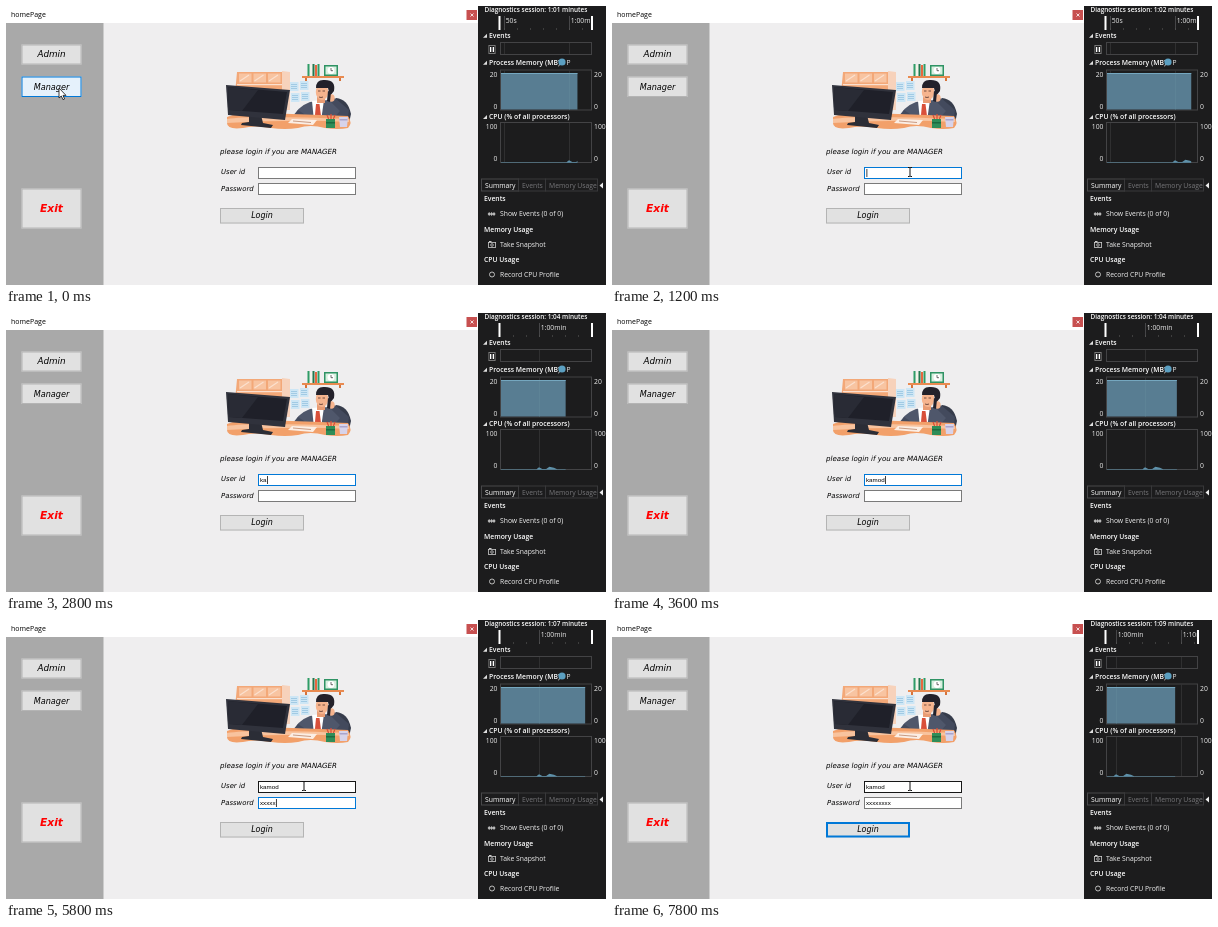
Recreate the animation shown at these times as an HTML page with a canvas. Size 600 by 279 pixels, loop 8000 ms.

```html
<!DOCTYPE html>
<html lang="en">
<head>
<meta charset="utf-8">
<title>Login form</title>
<style>
html, body { margin: 0; width: 100%; height: 100%; overflow: hidden; background: #efeeef; }
canvas { display: block; width: 100%; height: 100%; }
</style>
</head>
<body>
<canvas id="stage"></canvas>
<script>
const W = 600, H = 279, LOOP = 8000, STEP = 200;
const canvas = document.getElementById('stage');
const c = canvas.getContext('2d');
const SCRIPT = '"DejaVu Sans", sans-serif', UI = '"Open Sans", sans-serif', FIELD = '"Liberation Sans", Arial, sans-serif';
const BLUE = '#0078d7', USER = 'kamod';

function fit() {
  const r = window.devicePixelRatio || 1;
  canvas.width = Math.round(innerWidth * r);
  canvas.height = Math.round(innerHeight * r);
}

function rect(x, y, w, h, fill) {
  c.fillStyle = fill;
  c.fillRect(x, y, w, h);
}

function frame(x, y, w, h, color, lw = 1) {
  c.strokeStyle = color;
  c.lineWidth = lw;
  c.strokeRect(x + lw / 2, y + lw / 2, w - lw, h - lw);
}

function text(s, x, y, font, fill, align = 'left') {
  c.font = font;
  c.fillStyle = fill;
  c.textAlign = align;
  c.textBaseline = 'alphabetic';
  c.fillText(s, x, y);
}

const script = (s, x, y, size, { fill = '#000', align, weight = 400 } = {}) =>
  text(s, x, y, `italic ${weight} ${size}px ${SCRIPT}`, fill, align);

function shape(d, fill, stroke, lw = 1) {
  const p = new Path2D(d);
  if (fill) { c.fillStyle = fill; c.fill(p); }
  if (stroke) { c.strokeStyle = stroke; c.lineWidth = lw; c.stroke(p); }
}

function ellipse(x, y, rx, ry, fill) {
  c.beginPath();
  c.ellipse(x, y, rx, ry, 0, 0, Math.PI * 2);
  c.fillStyle = fill;
  c.fill();
}

function clipTo(x, y, w, h, draw) {
  c.save();
  c.beginPath();
  c.rect(x, y, w, h);
  c.clip();
  draw();
  c.restore();
}

// Form

function button(label, x, y, w, h, size, { hot = false, focus = false, fill, weight } = {}) {
  rect(x, y, w, h, hot ? '#e5f1fb' : '#e1e1e1');
  frame(x, y, w, h, hot || focus ? BLUE : '#b4b4b4', focus ? 2 : 1);
  script(label, x + w / 2, y + h / 2 + size * 0.34, size, { fill, weight, align: 'center' });
}

function field(y, value, border, caret) {
  rect(252, y, 98, 12, '#fff');
  frame(252, y, 98, 12, border);
  text(value, 254, y + 8.4, `6.2px ${FIELD}`, '#000');
  if (caret) rect(254.5 + c.measureText(value).width, y + 2, 0.8, 8, '#111');
}

function office() {
  // wall cabinet, notes and shelf
  shape('M231 66H276V98H228Z', '#f3a878');
  for (let i = 0; i < 3; i++) {
    rect(233 + i * 14.5, 67.5, 12.5, 9, '#f8c4a1');
    shape(`M${234 + i * 14.5} 75L${243 + i * 14.5} 69`, null, '#fbe0cf', 1.2);
  }
  rect(231, 78, 45, 1.2, '#fbe0cf');
  shape('M276 65L284 66V104H276Z', '#f7d2bb');
  [[284, 76], [294, 75], [285, 87], [295, 86]].forEach(([x, y]) => {
    rect(x, y, 8.5, 9, '#cde6f5');
    for (let i = 0; i < 3; i++) rect(x + 1, y + 2 + i * 2, 6, 0.7, '#8fbfdd');
  });
  rect(296, 70, 42, 2, '#e98a50');
  rect(299, 72, 2, 3, '#d6733b');
  rect(333, 72, 2, 3, '#d6733b');
  ['#2f9c66', '#f4f4e8', '#23794e', '#e8673f', '#2f9c66'].forEach((f, i) => rect(301.5 + i * 2.5, 58 + i % 2, 2, 12 - i % 2, f));
  rect(318, 59, 14, 11, '#2f9364');
  rect(319.5, 60.5, 11, 8, '#d8efdf');
  ellipse(325, 64.5, 3.4, 3.4, '#fff');
  shape('M325 62V64.7H327', null, '#333', 0.7);

  // chair and worker
  shape('M330 92Q342 93 345 108L343 117H329Z', '#363c4b');
  shape('M285 115Q290 101 304 96L322 94Q337 96 341 116Z', '#4f576b');
  shape('M306 95L318 94L315 115L308 115Z', '#fff');
  shape('M310 98L313.5 98L315 110L312 114L309 109Z', '#d9503a');
  rect(311, 91, 8, 6, '#e99c74');
  ellipse(316, 86, 6.2, 8, '#f6b48e');
  shape('M310 82Q310 73 319 74Q330 74 328 85L324 90L322 82Q315 82 310 82Z', '#23212a');
  shape('M312 85H314.5M316.5 85H319M313 91Q315 92 317 91', null, '#55332c', 0.8);
  shape('M325 115L334 105L325 96L329 92L343 104L342 112L333 117Z', '#434a5d');
  ellipse(325.5, 92, 3.2, 3.8, '#f6b48e');
  shape('M322 85L325 86L324 96L321 95Z', '#23232d');
  shape('M284 116L292 104L298 108L300 115Z', '#434a5d');
  ellipse(300, 114, 4, 2, '#f6b48e');

  // desk
  shape('M221 111Q236 105 258 107L342 110Q347 117 342 122Q332 124 319 122Q304 118 292 122Q279 124 265 122Q248 119 237 122Q221 124 221 117Z', '#f2a06a');
  shape('M221 113Q244 109 343 113V116Q290 113 221 117Z', '#f8c39e');
  shape('M286 113L311 114L307 119L282 117Z', '#fbeee5');
  shape('M287 115L305 116.5', null, '#c99a82', 1);

  // monitor
  shape('M243 108L255 109L257 117L267 119L265 122L235 119L236 117L243 116Z', '#2b2d36');
  shape('M220 79L284 84L279 114L222 109Z', '#30323c');
  shape('M222 81L281 86L277 108L223 104Z', '#1f2029');
  shape('M222 81L252 84L236 105L223 104Z', '#292b35');

  // desk items
  shape('M321 109L323 114M325 108V114M329 109L327 114', null, '#d9503a', 1.3);
  rect(320, 113, 9, 9, '#2f8d58');
  rect(320, 116, 9, 1.5, '#1d6a40');
  shape('M333 111H342L341 121H334Z', '#d7d3ea');
  rect(333.5, 113, 8, 1.5, '#aaa4cc');
}

function form(s) {
  rect(0, 0, 472, H, '#efeeef');
  rect(0, 17, 97.5, H - 17, '#a9a9a9');
  rect(0, 0, 472, 17, '#fff');
  text('homePage', 5, 11, `7px ${UI}`, '#000');
  rect(460.5, 4, 10.5, 10, '#c75050');
  shape('M464.5 7.5L467.5 10.5M467.5 7.5L464.5 10.5', null, '#fff', 0.8);

  button('Admin', 15.5, 38.5, 60, 20, 8.8);
  button('Manager', 15.5, 70.5, 60, 20.5, 8.1, { hot: s.hover, focus: s.focus === 'manager' && !s.hover });
  button('Exit', 15.5, 182.5, 60, 40, 10.7, { fill: '#f00', weight: 700 });

  office();
  script('please login if you are MANAGER', 214, 147.7, 7.1);
  script('User id', 215, 168.3, 6.9);
  script('Password', 215, 185, 6.9);
  field(161, s.user, s.focus === 'user' ? BLUE : s.ibeam ? '#171717' : '#7a7a7a', s.focus === 'user' && s.caret);
  field(177, s.pass, s.focus === 'pass' ? BLUE : '#7a7a7a', s.focus === 'pass' && s.caret);
  button('Login', 214, 202, 84, 15.5, 8, { focus: s.focus === 'login' });
}

// Diagnostics panel

const LEFT = 495, RIGHT = 585, PX = 6.5;
const CPU = [[59.6, 0], [60, 2], [60.5, 0.3], [61.1, 0.3], [61.6, 2.6], [62.3, 1.6], [62.8, 0], [70, 0]];
const bold = (s, x, y, size = 6.8) => text(s, x, y, `600 ${size}px ${UI}`, '#fff');
const plain = (s, x, y, fill = '#f1f1f1') => text(s, x, y, `6.8px ${UI}`, fill);

function chart(y, h, top, xAt) {
  frame(494, y, 92, h, '#434345');
  if (top) {
    [[top, y + 7.3], ['0', y + h - 2]].forEach(([s, ty]) => {
      text(s, 491.5, ty, `6.8px ${UI}`, '#eee', 'right');
      text(s, 588, ty, `6.8px ${UI}`, '#eee');
    });
  }
  for (let k = 50; k <= 70; k += 10) {
    const x = xAt(k);
    if (x > LEFT && x < RIGHT) rect(x, y + 1, 0.7, h - 2, '#38383a');
  }
}

function heading(s, y) {
  shape(`M481 ${y - 4.5}V${y - 0.5}H477Z`, '#e0e0e0');
  bold(s, 483, y);
}

function panel(t) {
  const now = 61.3 + t / 1000;
  const minute = t < 1600 ? 563 : t < 6400 ? 533 : 504;
  const xAt = sec => minute + (sec - 60) * PX;
  const edge = xAt(now);

  rect(472, 0, 128, H, '#1c1c1d');
  bold(`Diagnostics session: 1:0${Math.floor(now) - 60} minutes`, 478.5, 6.4, 6.4);
  clipTo(LEFT, 9, RIGHT - LEFT, 16, () => {
    [[50, '50s'], [60, '1:00min'], [70, '1:10min']].forEach(([sec, label]) => {
      rect(xAt(sec), 10, 0.7, 14, '#5a5a5c');
      text(label, xAt(sec) + 1.7, 17.2, `6.8px ${UI}`, '#eee');
    });
    for (let sec = 48; sec < 76; sec += 2) rect(xAt(sec), 22, 0.6, 2, '#555');
  });
  rect(492.5, 10, 2, 14, '#fff');
  rect(585, 10, 2, 14, '#fff');

  heading('Events', 32.3);
  chart(36, 13, '', xAt);
  frame(482.5, 39, 7, 9, '#8a8a8a', 0.8);
  rect(484, 41, 1.3, 5, '#fff');
  rect(486.7, 41, 1.3, 5, '#fff');

  heading('Process Memory (MB)', 59.2);
  ellipse(556, 56, 3.6, 3.6, '#5b9fc1');
  clipTo(560, 50, 4.5, 11, () => plain('P', 560.5, 59.2));
  chart(63.5, 41, '20', xAt);
  rect(LEFT, 67, edge - LEFT, 36.5, '#587d92');
  rect(LEFT, 67, edge - LEFT, 1, '#75a7bf');
  const grid = xAt(60);
  if (grid < edge) rect(grid, 68, 0.6, 35.5, '#62879a');

  heading('CPU (% of all processors)', 113.4);
  chart(116, 41, '100', xAt);
  clipTo(LEFT, 117, Math.max(0, edge - LEFT), 40, () => {
    const line = CPU.map(([sec, v]) => `L${xAt(sec)} ${156.3 - v}`).join('');
    shape(`M${LEFT} 156.8L${LEFT} 156.3${line}L${xAt(70)} 156.8Z`, '#5e91aa');
  });

  frame(475, 172.5, 38, 13, '#48484a');
  frame(512, 172.5, 28, 13, '#38383a');
  frame(539, 172.5, 53, 13, '#38383a');
  plain('Summary', 479, 181.8, '#fff');
  plain('Events', 516, 181.8, '#77777a');
  clipTo(541, 173, 50, 12, () => plain('Memory Usage', 543, 181.8, '#77777a'));
  shape('M597 176.5V182.5L593.5 179.5Z', '#eee');

  [['Events', 'Show Events (0 of 0)', 195], ['Memory Usage', 'Take Snapshot', 225.5], ['CPU Usage', 'Record CPU Profile', 256]].forEach(([head, row, y]) => {
    bold(head, 478, y);
    plain(row, 494, y + 15.2);
  });
  for (let i = 0; i < 3; i++) shape(`M${481.6 + i * 2.4} 208L${483.2 + i * 2.4} 206L${484.8 + i * 2.4} 208L${483.2 + i * 2.4} 210Z`, '#bbb');
  frame(482, 236, 8, 6, '#ccc', 0.8);
  rect(483, 235, 2.5, 1, '#ccc');
  ring(486, 239, 1.3, 0.8);
  ring(486, 268.5, 2.5, 0.9);
}

function ring(x, y, r, lw) {
  c.beginPath();
  c.arc(x, y, r, 0, Math.PI * 2);
  c.strokeStyle = '#ccc';
  c.lineWidth = lw;
  c.stroke();
}

// Timeline

function typed(s, start, t) {
  return s.slice(0, Math.max(0, Math.floor((t - start) / STEP) + 1));
}

function stateAt(t) {
  const p = Math.min(1, t / 1000);
  const e = p * p * (3 - 2 * p);
  const x = 53 + 245 * e, y = 82 + 84 * e;
  const focus = t < 1200 ? 'manager' : t < 4200 ? 'user' : t < 4600 ? 'login' : t < 7400 ? 'pass' : 'login';
  const last = t >= 5000 ? Math.min(t, 6400) : t >= 4600 ? 4600 : t >= 2600 ? Math.min(t, 3400) : 900;
  return {
    x, y, focus,
    hover: x < 75 && y < 91,
    ibeam: x >= 252 && y >= 161,
    pointer: t < 2600 || t >= 4200,
    caret: (t - last) % 1060 < 530,
    user: typed(USER, 2600, t),
    pass: typed('x'.repeat(8), 5000, t)
  };
}

function pointer(s) {
  if (!s.pointer) return;
  c.save();
  c.translate(s.x, s.y);
  if (s.ibeam) shape('M-2 -4.5H-0.6L0 -4L0.6 -4.5H2M0 -4V4M-2 4.5H-0.6L0 4L0.6 4.5H2', null, '#111', 1);
  else shape('M0 0V10L2.3 8L4 11.7L5.6 11L4 7.4H7Z', '#fff', '#111', 0.8);
  c.restore();
}

function draw(ms) {
  const t = Math.floor(ms % LOOP / STEP) * STEP;
  const s = stateAt(t);
  c.setTransform(canvas.width / W, 0, 0, canvas.height / H, 0, 0);
  form(s);
  panel(t);
  pointer(s);
}

let start;
function tick(now) {
  start ??= now;
  draw(now - start);
  requestAnimationFrame(tick);
}

addEventListener('resize', fit);
fit();
draw(0);
requestAnimationFrame(tick);
</script>
</body>
</html>
```
